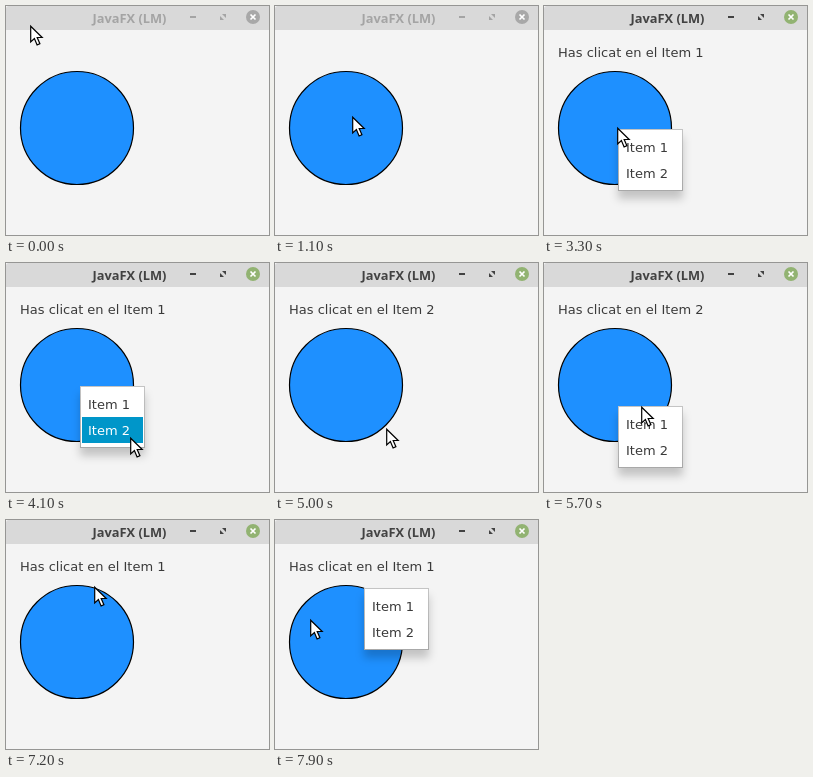
Write an HTML page that moves like this. It is 263 by 229 pixels and loops after 8000 ms.

```html
<!DOCTYPE html>
<html lang="ca">
<head>
<meta charset="utf-8">
<title>JavaFX (LM)</title>
<style>
  html, body { margin: 0; width: 263px; height: 229px; overflow: hidden; background: #f4f4f4; }
  svg { display: block; }
  text { font: 13px "DejaVu Sans", sans-serif; fill: #3a3a3a; }
  .title { font: 600 12.8px "Noto Sans", "Open Sans", sans-serif; text-anchor: middle; }
  #bar { --ink: #424242; --close: #92b372; }
  #bar.idle { --ink: #a4a4a4; --close: #a8a8a8; }
  #bar .ink { fill: var(--ink); }
  #bar .close { fill: var(--close); }
  .row rect { fill: none; }
  .row.on rect { fill: #0096c9; }
  .row.on text { fill: #fff; }
</style>
</head>
<body>
<svg width="263" height="229" viewBox="0 0 263 229">
  <defs>
    <linearGradient id="edge" x2="0" y2="1">
      <stop stop-color="#c4c4c4"/>
      <stop offset="1" stop-color="#a8a8a8"/>
    </linearGradient>
    <filter id="shadow" x="-50%" y="-50%" width="200%" height="200%">
      <feDropShadow dx="0" dy="8" stdDeviation="4.5" flood-opacity=".2"/>
    </filter>
  </defs>

  <rect width="263" height="229" fill="#f4f4f4"/>
  <g id="bar">
    <path d="M0 24V3Q0 0 3 0H263V24Z" fill="#d9d9d9"/>
    <text class="title ink" x="123.5" y="17">JavaFX (LM)</text>
    <rect class="ink" x="184" y="10" width="6" height="2"/>
    <path class="ink" d="M216 8H220V12ZM214 10V14H218Z"/>
    <circle class="close" cx="247" cy="11" r="7"/>
    <path d="M244.5 8.5l5 5m0 -5l-5 5" stroke="#fff" stroke-width="1.7"/>
  </g>

  <text id="label" x="14" y="51"></text>
  <circle cx="71" cy="122" r="56.5" fill="#1e90ff" stroke="#000" stroke-width="1.2"/>

  <g id="menu">
    <rect width="65" height="62" fill="url(#edge)" filter="url(#shadow)"/>
    <rect x="1" y="1" width="63" height="60" fill="#fff"/>
    <g class="row"><rect x="2" y="5" width="61" height="26"/><text x="8" y="23">Item 1</text></g>
    <g class="row"><rect x="2" y="31" width="61" height="26"/><text x="8" y="49">Item 2</text></g>
  </g>

  <path id="cursor" d="M.7 1.2V17L4.4 13.6 7.1 19.9 9.9 18.7 7.2 12.5H12.2Z"
        fill="#fff" stroke="#000" stroke-width="1.2"/>
</svg>
<script>
  const LOOP = 8000, TICK = 100, ROW = 26, PAD = 5;
  const $ = id => document.getElementById(id);
  const rows = [...document.querySelectorAll('.row')];

  const home = [24, 19];
  const moves = [
    { at: 200, ticks: 3, to: [88, 115] },
    { at: 500, ticks: 1, to: [79, 126] },
    { at: 1000, ticks: 3, to: [76, 105] },
    { at: 1800, ticks: 3, to: [107, 125] },
    { at: 3000, ticks: 2, to: [73, 121] },
    { at: 3500, ticks: 7, to: [124, 174] },
    { at: 5000, ticks: 3, to: [73, 141] },
    { at: 5500, ticks: 3, to: [97, 143] },
    { at: 5800, ticks: 2, to: [113, 157] },
    { at: 6700, ticks: 2, to: [123, 145] },
    { at: 7100, ticks: 2, to: [88, 66] },
    { at: 7600, ticks: 4, to: [35, 99] }
  ];
  const opens = [1400, 3300, 5400, 7400];
  const picks = [2800, 4600, 6500];

  const smooth = p => p * p * (3 - 2 * p);
  const latest = (times, t) => times.findLast(time => time <= t) ?? -1;

  // The pointer is sampled once per tick.
  function pointer(t) {
    const i = moves.findLastIndex(move => move.at <= t);
    if (i < 0) return home;
    const { at, ticks, to } = moves[i];
    const from = i ? moves[i - 1].to : home;
    const p = smooth(Math.min(1, (Math.floor((t - at) / TICK) + 1) / ticks));
    return to.map((end, k) => Math.round(from[k] + (end - from[k]) * p));
  }

  // A menu opens just below and right of the pointer.
  function menuAt(opened) {
    const [x, y] = pointer(opened);
    return [x + 1, y + 2];
  }

  function rowAt(t, opened) {
    const [x, y] = menuAt(opened);
    const [px, py] = pointer(t);
    const row = Math.floor((py + 1 - y - PAD) / ROW);
    return px >= x && rows[row] ? row : -1;
  }

  function draw(t) {
    const opened = latest(opens, t), picked = latest(picks, t);
    $('cursor').setAttribute('transform', `translate(${pointer(t)})`);
    $('bar').classList.toggle('idle', opened < 0);
    $('label').textContent = picked < 0 ? ''
      : `Has clicat en el Item ${rowAt(picked, latest(opens, picked)) + 1}`;

    const showing = opened > picked;
    $('menu').style.display = showing ? '' : 'none';
    if (!showing) return;
    $('menu').setAttribute('transform', `translate(${menuAt(opened)})`);
    // Only the first menu opens with its top row focused.
    const initial = opened === opens[0] ? 0 : -1;
    const focus = Math.max(rowAt(t, opened), initial);
    rows.forEach((row, i) => row.classList.toggle('on', i === focus));
  }

  function frame() {
    draw(performance.now() % LOOP);
    requestAnimationFrame(frame);
  }
  frame();
</script>
</body>
</html>
```
